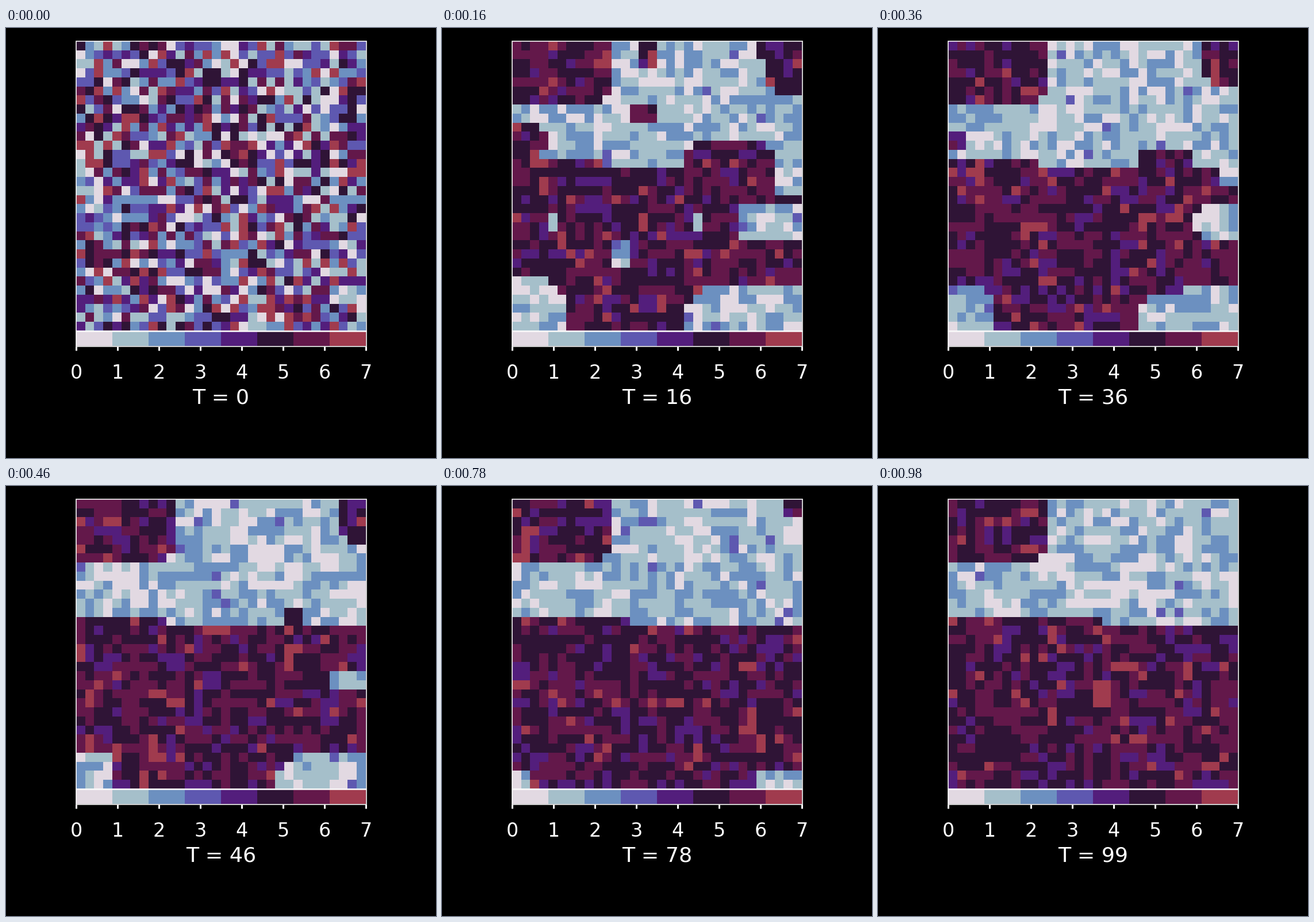
Write a matplotlib script that moves like this. It is 748x748 px and loops after 1 s.

```python
import numpy as np
import matplotlib.pyplot as plt
from matplotlib.animation import FuncAnimation
from matplotlib.colors import ListedColormap
from matplotlib.patches import Rectangle

SIZE, DPI = 748, 100
N, STATES, FRAMES, INTERVAL = 32, 8, 50, 20
LAST_T, SETTLED_T = 99, 8
PX = 72 / DPI  # points per pixel
LEFT, RIGHT, TOP, BOTTOM = 122, 626, 23, 527
PALETTE = ListedColormap(["#e2d9e2", "#a5bfca", "#6c90c0", "#5e58b0",
                          "#531e7c", "#2f1436", "#63184a", "#a03b4e"])

rng = np.random.default_rng(8)
ROWS, COLS = np.indices((N, N))
X, Y = COLS + .5, ROWS + .5  # cell centres


def blob(x, y, rx, ry, t, end):
    """Boxy patch whose area shrinks steadily until it is gone at time end."""
    size = np.sqrt(max(1e-9, 1 - t / end))
    return ((X - x) / (rx * size)) ** 4 + ((Y - y) / (ry * size)) ** 4 < 1


def dark_phase(t):
    """Cells of the dark phase: a broad band, a corner block, shrinking islands."""
    step = np.interp(t, [60, LAST_T], [10, 17])
    dark = Y > 13 + (X > step)
    dark |= (X < 11) & (Y < 7) & (X + Y < 16.5)
    dark |= blob(32, 0, 5, 6.5, t, 90)
    dark |= blob(0, 11, 4.5, 3, t, 45) | blob(24, 13, 6.5, 2, t, 50)
    dark |= blob(14.5, 8, 5, 2.4, t, 18) | blob(15, 1.5, 2.6, 4, t, 18)
    dark &= ~(blob(0, 32, 6.5, 6.5, t, 88) | blob(32, 32, 14, 6, t, 90))
    dark &= ~(blob(32, 20, 8, 2.7, t, 62) | blob(32, 14, 4, 4, t, 45))
    for x, y, height in ((4.5, 20, 3), (12.3, 23.5, 5), (20.5, 20, 3)):
        dark &= ~blob(x, y, 2.5, height, t, 18)
    return dark


# Heat bath: share of each state inside its phase, and pull between neighbours.
SHARE = np.array([.25, .45, .28, .02, .14, .46, .33, .07])
STATE = np.arange(STATES)
IS_DARK = STATE >= STATES // 2
SAME_PHASE = (IS_DARK[:, None] == IS_DARK).astype(float)
AFFINITY = SAME_PHASE * np.clip(1 - abs(STATE[:, None] - STATE) / 2, 0, 1)
EXCESS = 0.6 * (AFFINITY - SAME_PHASE * (AFFINITY @ SHARE))


def sweep(spins, t):
    target = dark_phase(t)
    for parity in (0, 1):
        near = np.stack([np.roll(spins, step, axis) for step in (1, -1) for axis in (0, 1)])
        dark = target
        if t < SETTLED_T:
            pull = (2 * IS_DARK[near] - 1).sum(axis=0) + t / 3 * (2 * target - 1)
            dark = rng.random((N, N)) < 1 / (1 + np.exp(-pull))
        logits = np.log(SHARE) + EXCESS[near].sum(axis=0)
        logits[dark[..., None] != IS_DARK] = -np.inf
        drawn = (logits + rng.gumbel(size=logits.shape)).argmax(axis=2)
        spins = np.where((ROWS + COLS) % 2 == parity, drawn, spins)
    return spins


history = [rng.integers(0, STATES, (N, N))]
for t in range(1, LAST_T + 1):
    history.append(sweep(history[-1], t))

fig = plt.figure(figsize=(SIZE / DPI, SIZE / DPI), dpi=DPI, facecolor="black")
ax = fig.add_axes([0, 0, 1, 1])
ax.axis("off")


def show(cells, y0, y1):
    return ax.imshow(cells, cmap=PALETTE, vmin=0, vmax=STATES - 1, aspect="auto",
                     interpolation="nearest", extent=(LEFT, RIGHT, y1, y0))


def frame(y0, y1):
    ax.add_patch(Rectangle((LEFT - .3, y0), RIGHT - LEFT + .8, y1 - y0, fill=False,
                           edgecolor="white", linewidth=1.6 * PX, zorder=3))


def label(x, y, text, size):
    return ax.text(x, y, text, color="white", family="DejaVu Sans",
                   fontsize=size * PX, ha="center", va="baseline")


grid = show(history[0], TOP, BOTTOM)
show(STATE[None], 528.5, 553.5)
frame(TOP - .5, BOTTOM + .3)
frame(528.3, 553.7)
for value in STATE:
    x = LEFT + (RIGHT - LEFT) * value / (STATES - 1)
    ax.plot([x, x], [554, 561], color="white", linewidth=3 * PX, solid_capstyle="butt")
    label(x, 610, str(value), 33.4)
caption = label((LEFT + RIGHT) / 2, 654, "T = 0", 36.4)
ax.set_xlim(0, SIZE)
ax.set_ylim(SIZE, 0)


def update(k):
    t = LAST_T if k == FRAMES - 1 else 2 * k
    grid.set_data(history[t])
    caption.set_text(f"T = {t}")
    return grid, caption


anim = FuncAnimation(fig, update, frames=FRAMES, interval=INTERVAL,
                     repeat=True, repeat_delay=0, blit=False)
plt.show()
```
